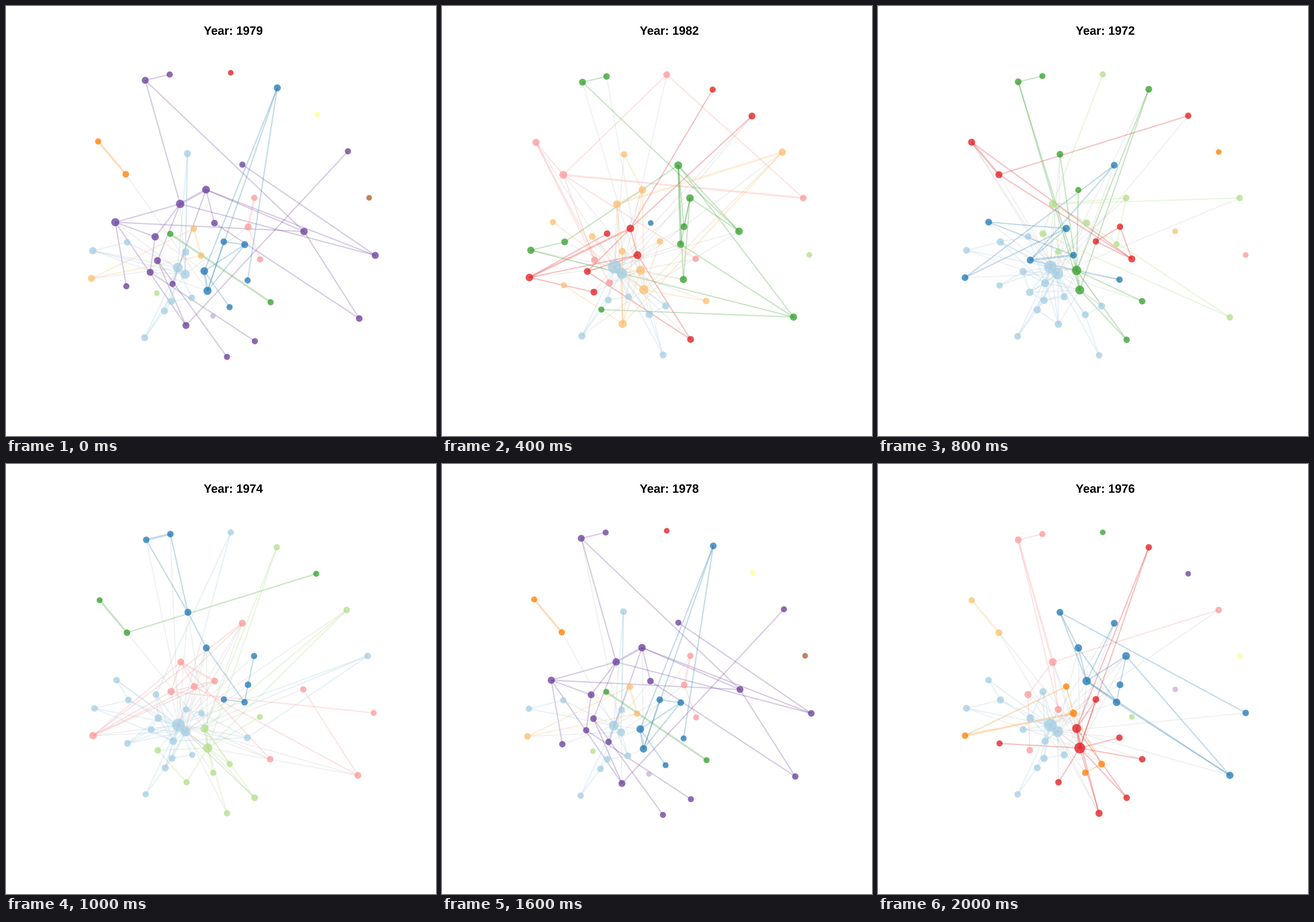
Recreate the animation shown at these times as a matplotlib script. Size 748 by 748 pixels, loop 2.2 s.

```python
import math
import random

import matplotlib.pyplot as plt
from matplotlib.animation import ArtistAnimation
from matplotlib.collections import LineCollection
from matplotlib.colors import to_rgba

SIZE, DPI, STEP = 748, 100, 200
PT = 72 / DPI
CX, CY = 395.4, 363.3
CORE = 33

PALETTE = dict(
    sky="#A6CEE3", blue="#1F78B4", lime="#B2DF8A", green="#33A02C",
    pink="#FB9A99", red="#E31A1C", sand="#FDBF6F", orange="#FF7F00",
    lilac="#CAB2D6", purple="#6A3D9A", yellow="#FFFF99", brown="#B15928")
GREY = to_rgba("#BEBEBE", 0.27)

NODES = [
    (244, 132), (286, 122), (391, 119), (471, 145), (539.5, 191), (592.5, 254),
    (629, 334), (639.5, 433), (612, 541.5), (517, 392), (163, 237),
    (210.5, 293.5), (316.5, 258), (348.5, 320), (411, 277), (431.5, 334),
    (304, 344.5), (363, 377.5), (421, 384), (415, 414.5), (379, 409.5),
    (327.5, 387), (287, 396), (261, 401), (192.5, 376), (213, 410.5),
    (154, 425), (151.5, 472.5), (211.5, 486), (252.5, 462), (265, 442),
    (313.5, 427), (340, 433.5), (300, 454), (312.5, 465.5), (345.5, 460),
    (351, 494), (291, 482), (264, 498), (289, 512), (324, 506), (277, 528.5),
    (314, 553.5), (360.5, 537), (389, 522), (432.5, 580.5), (384.5, 607.5),
    (243, 574.5), (420, 476), (459.5, 513.5), (441.5, 440)]

# Radius of the core node, then each community as stars: a hub and the nodes
# it links to. Nodes not named here form the sky community around the core.
YEARS = {
    1973: (11, dict(
        blue=[[30, 32, 14, 48, 21], [24, 21, 32], [27, 14, 21]],
        green=[[35, 36, 3, 12, 13, 49, 45], [36, 0, 3, 45], [0, 1, 35]],
        lime=[[16, 17, 2, 6, 22, 31], [15, 16, 19], [8, 17, 22]],
        red=[[11, 10, 4, 50], [50, 10, 18, 20], [18, 20]],
        orange=[[5]], sand=[[9]], pink=[[7]])),
    1974: (11, dict(
        blue=[[0, 1, 12], [12, 1, 13], [19, 13, 20, 18], [15, 18]],
        lime=[[36, 35, 3, 5, 42, 43, 44, 45, 46, 50], [35, 3, 5, 44, 45],
              [38, 36, 42]],
        green=[[11, 10, 4]],
        pink=[[16, 17, 21, 22, 27, 49], [22, 7, 14, 17, 27],
              [27, 14, 17, 21], [8, 9, 21]])),
    1975: (11.3, dict(
        lime=[[16, 17, 0, 7, 22, 27], [17, 14, 19, 27], [13, 12, 17],
              [22, 7, 14], [18, 15, 19], [0, 1]],
        blue=[[35, 36, 3, 46, 49], [36, 3, 20, 32, 41, 42, 43, 44, 45, 46],
              [3, 20, 32, 49], [43, 44]],
        pink=[[11, 10, 6, 21], [21, 4, 10], [4, 5, 48]],
        green=[[8, 9]])),
    1976: (11, dict(
        pink=[[16, 0, 5, 23, 31], [0, 1, 31], [23, 38]],
        red=[[36, 35, 3, 20, 28, 42, 45, 46, 48, 49], [35, 3, 20, 45, 46]],
        blue=[[17, 19, 8, 13, 14, 15], [12, 7, 13, 17], [19, 8, 13, 18],
              [15, 8, 18]],
        orange=[[32, 27, 44], [21, 27, 32], [43, 44]],
        sand=[[10, 11]], green=[[2]], purple=[[4]], lilac=[[9]],
        yellow=[[6]], lime=[[50]])),
    1979: (8.5, dict(
        purple=[[16, 13, 0, 7, 23, 24, 30], [24, 9, 23, 28, 42],
                [13, 7, 9, 17, 37], [0, 1, 9], [30, 42, 46], [29, 23, 45],
                [9, 8], [14, 7], [17, 8], [5, 42]],
        blue=[[35, 36, 3, 19, 44], [36, 3, 19, 20], [3, 48], [20, 19]],
        sand=[[32, 21, 27], [21, 27]], pink=[[18, 15, 50]],
        orange=[[10, 11]], green=[[22, 49]], lime=[[38]], lilac=[[43]],
        red=[[2]], yellow=[[4]], brown=[[6]])),
    1980: (11.6, dict(
        pink=[[11, 6, 2, 10, 30, 50], [10, 30, 37], [2, 6]],
        red=[[21, 27, 3, 4, 29, 32], [27, 22, 32, 38], [29, 32, 45], [45, 32]],
        green=[[14, 19, 8, 9, 18, 25, 48], [15, 9, 18, 19, 48],
               [8, 19, 26, 41], [0, 1, 9], [25, 26]],
        sand=[[16, 5, 13, 31, 42], [13, 12, 36, 42], [36, 5, 20, 23, 24, 49],
              [42, 5, 28, 31, 35]],
        blue=[[17]], lime=[[7]])),
    1981: (10, dict(
        purple=[[11, 10, 4, 50], [4, 8, 10], [9, 0, 8, 14], [0, 1], [14, 7]],
        brown=[[16, 5, 23, 24, 27, 31, 42, 45], [5, 23, 27, 36, 42],
               [27, 23, 24, 31, 32, 36, 45], [36, 24, 42, 44, 45],
               [31, 23, 36, 42], [24, 38]],
        pink=[[19, 18, 12, 13, 20], [18, 12, 15], [13, 22], [20, 49]],
        sand=[[25, 26]], red=[[2]], orange=[[3]], yellow=[[28]],
        green=[[17]], lime=[[21]], blue=[[35]], lilac=[[43]])),
}

# Shown year and the year whose communities it shares.
ORDER = [(1979, 1979), (1980, 1980), (1982, 1980), (1973, 1973), (1972, 1973),
         (1974, 1974), (1977, 1976), (1975, 1975), (1978, 1979),
         (1981, 1981), (1976, 1976)]

plt.rcParams["text.hinting"] = "none"
fig = plt.figure(figsize=(SIZE / DPI, SIZE / DPI), dpi=DPI, facecolor="white")
ax = fig.add_axes([0, 0, 1, 1])
ax.set_xlim(0, SIZE)
ax.set_ylim(SIZE, 0)
ax.axis("off")


def gap(a, b):
    return math.dist(NODES[a], NODES[b])


def core_links(rest, rng):
    """Every node joins the core, its nearest neighbour and perhaps a sub-hub."""
    links = {(CORE, n) for n in rest if n != CORE}
    for n in rest:
        near = min((m for m in rest if m != n), key=lambda m: gap(n, m))
        links.add((min(n, near), max(n, near)))
        for hub in (30, 34, 37):
            if hub in rest and n not in (hub, CORE) and rng.random() < 0.3:
                links.add((min(n, hub), max(n, hub)))
    return sorted(links)


def cross_links(names, single, haze, rng):
    """Faint links from nodes to the central hubs, rarer with distance."""
    links = []
    for hub, share in ((CORE, 1), (34, 0.7), (35, 0.35), (36, 0.35)):
        for n in range(len(NODES)):
            if names[n] == names[hub] or single & {n, hub}:
                continue
            if rng.random() < haze * share * min(1, 220 / gap(n, hub)):
                links.append((n, hub))
    return links


def draw(year, base):
    peak, groups = YEARS[base]
    rng = random.Random(year)
    names = ["sky"] * len(NODES)
    single, heavy, inner = set(), set(), []
    for name, stars in groups.items():
        for hub, *ends in stars:
            names[hub] = name
            for n in ends:
                names[n] = name
                inner.append((hub, n))
        if stars[0][1:]:
            heavy.add(tuple(stars[0][:2]))
        else:
            single.add(stars[0][0])
    inner += core_links([n for n, c in enumerate(names) if c == "sky"], rng)
    cross = cross_links(names, single, 0.15 * (peak - 7.7), rng)

    degree = [0] * len(NODES)
    for a, b in inner + cross:
        degree[a] += 1
        degree[b] += 1
    top = max(degree)
    radius = [4.9 + (peak - 4.9) * (d / top) ** 0.85 for d in degree]

    # The layout shrinks a little as its largest node grows.
    k = 1 + 0.0045 * (11.1 - peak)
    pos = [(CX + (x - CX) * k, CY + (y - CY) * k) for x, y in NODES]
    links = cross + inner
    tints = [GREY] * len(cross)
    tints += [to_rgba(PALETTE[names[a]], 0.28) for a, _ in inner]
    widths = [1.5 * PT] * len(cross)
    widths += [(3.4 if link in heavy else 2.1) * PT for link in inner]

    edges = LineCollection([(pos[a], pos[b]) for a, b in links],
                           colors=tints, linewidths=widths, zorder=1)
    ax.add_collection(edges, autolim=False)
    dots = ax.scatter(*zip(*pos), s=[(2 * r * PT) ** 2 for r in radius],
                      c=[to_rgba(PALETTE[n], 0.76) for n in names],
                      linewidths=0, zorder=2)
    title = ax.text(395.6, 50.2, f"Year: {year}", ha="center", va="baseline",
                    family="Liberation Sans", weight="bold",
                    size=20.8 * PT, color="black")
    return [edges, dots, title]


scenes = [draw(year, base) for year, base in ORDER]
anim = ArtistAnimation(fig, scenes, interval=STEP, repeat=True, repeat_delay=0)
plt.show()
```
